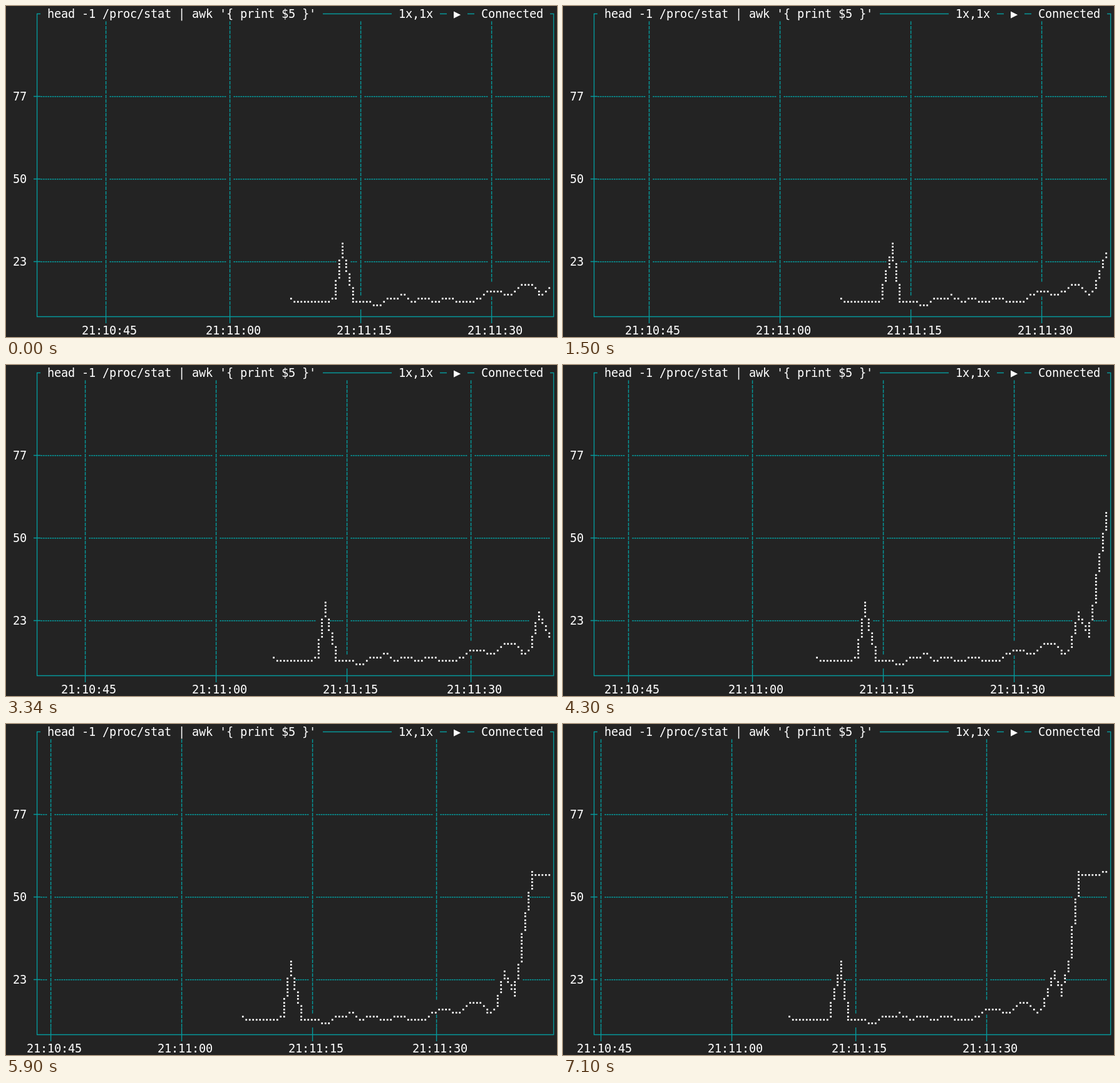
An HTML page for the animation above (8000 ms loop, 880 by 529 pixels).

```html
<!DOCTYPE html>
<html lang="en">
<head>
<meta charset="utf-8">
<title>Terminal chart</title>
<style>
  html, body { margin: 0; width: 100%; height: 100%; overflow: hidden; background: #232323; }
  svg { display: block; width: 880px; height: 529px; }
  text {
    font: 18.67px "DejaVu Sans Mono", monospace;
    letter-spacing: calc(11px - 1ch);
    fill: #fff;
    white-space: pre;
  }
  #grid text { fill: #06989a; letter-spacing: 0; }
  #dots text { font-family: "DejaVu Sans", sans-serif; letter-spacing: 0; }
  #frame, #ticks { fill: none; stroke: #06989a; stroke-width: 1.4; }
</style>
</head>
<body>
<svg viewBox="0 0 880 529">
  <path id="frame"/>
  <path id="ticks"/>
  <g id="grid"></g>
  <g id="dots"></g>
  <g id="labels"></g>
</svg>
<script>
const CW = 11, CH = 22, LOOP = 8000;
const LEFT = 4, RIGHT = 79, BOTTOM = 22;
const GRID_ROWS = [6, 12, 18];
const TIMES = ["21:10:45", "21:11:00", "21:11:15", "21:11:30"];

// Braille dot bits by [side][row]
const BITS = [[1, 2, 4, 64], [8, 16, 32, 128]];

// [start ms, seconds scrolled, scroll in braille columns, samples shown]
const STEPS = [
  [0, 0, 0, 31],
  [900, 1, 2.5, 32],
  [1900, 2, 5, 33],
  [4300, 4, 9.93, 35],
  [5000, 5, 12.43, 36],
  [5900, 6, 14.93, 37],
  [7100, 7, 17.43, 38]
];

// One sample per second, in braille rows from the top
const SAMPLES = [
  84.4, 85.2, 85.2, 85.2, 85.2, 84, 68, 85, 85, 85.4,
  86.4, 84, 84, 83, 85, 84, 84.4, 85.2, 84, 84.4,
  85.2, 85.2, 84, 82, 81.7, 83.1, 82.25, 80, 79.7, 83.2,
  81.3, 71, 78, 65, 42.4, 43.2, 43.2, 42
];

const $ = id => document.getElementById(id);
const midX = col => col * CW + 5.6;
const midY = row => row * CH + 12.5;
const hLine = (x0, x1, y) => `M${x0} ${y}H${x1}`;

function addText(group, col, row, str) {
  const el = document.createElementNS("http://www.w3.org/2000/svg", "text");
  el.setAttribute("x", col * CW);
  el.setAttribute("y", row * CH + 19);
  el.textContent = str;
  $(group).append(el);
  return el;
}

function drawFrame() {
  const l = midX(LEFT), r = midX(RIGHT), t = midY(0), b = midY(BOTTOM);
  let d = `M${(LEFT + 1) * CW} ${t}H${l}V${b}H${r}V${t}H${RIGHT * CW}`;
  for (const [from, to] of [[46, 56], [63, 64], [67, 68]]) d += hLine(from * CW, to * CW, t);
  for (const row of GRID_ROWS) d += hLine(LEFT * CW, (LEFT + 1) * CW, midY(row));
  $("frame").setAttribute("d", d);

  const label = (col, row, str) => addText("labels", col, row, str);
  label(6, 0, "head -1 /proc/stat | awk '{ print $5 }'");
  label(57, 0, "1x,1x");
  label(65, 0, "▶");
  label(69, 0, "Connected");
  ["77", "50", "23"].forEach((s, i) => label(1, GRID_ROWS[i], s));
}

function segment(x0, a, x1, b, plot) {
  const dx = x1 - x0, y0 = Math.round(a), y1 = Math.round(b);
  const dy = Math.abs(y1 - y0), up = y1 < y0;
  if (dy <= dx) {
    for (let i = 0; i <= dx; i++) plot(x0 + i, Math.round(a + (b - a) * i / dx));
    return;
  }
  // Steep: share the rows evenly between the columns
  for (let i = 0; i <= dy; i++) {
    const step = Math.floor(i * (dx + 1) / (up ? dy + 1 : dy));
    plot(x0 + Math.min(dx, step), up ? y0 - i : y0 + i);
  }
}

// Character cells are kept in a Map from row * 80 + col to a value
const cellId = (col, row) => row * 80 + col;

function traceCurve(scroll, count) {
  const cells = new Map();
  const plot = (x, y) => {
    const id = cellId(x >> 1, y >> 2);
    cells.set(id, cells.get(id) | BITS[x & 1][y & 3]);
  };
  const xAt = i => Math.round((i ? 82.09 + 2.494 * i : 82.45) - scroll);
  for (let i = 1; i < count; i++) segment(xAt(i - 1), SAMPLES[i - 1], xAt(i), SAMPLES[i], plot);
  return cells;
}

function traceGrid(cols, curve) {
  const cells = new Map();
  const put = (col, row, ch) => curve.has(cellId(col, row)) || cells.set(cellId(col, row), ch);
  for (const row of GRID_ROWS) {
    for (let col = LEFT + 1; col < RIGHT; col++) put(col, row, "┄");
  }
  for (const col of cols) {
    for (let row = 1; row < BOTTOM; row++) put(col, row, "┆");
  }
  return cells;
}

function printCells(group, cells, toChar) {
  const rows = {};
  for (const [id, value] of cells) (rows[Math.floor(id / 80)] ??= []).push([id % 80, toChar(value)]);
  $(group).replaceChildren();
  for (const row in rows) {
    const el = addText(group, 0, row, rows[row].map(c => c[1]).join(""));
    el.setAttribute("x", rows[row].map(c => c[0] * CW).join(" "));
  }
}

drawFrame();
const timeLabels = TIMES.map(s => addText("labels", 0, 23, s));
let shown = null;

function show([, seconds, scroll, count]) {
  const cols = TIMES.map((_, i) => Math.floor(14.1 + 18.75 * i - 1.25 * seconds));
  const curve = traceCurve(scroll, count);
  printCells("dots", curve, bits => String.fromCharCode(0x2800 + bits));
  printCells("grid", traceGrid(cols, curve), ch => ch);
  $("ticks").setAttribute("d", cols.map(c => `M${midX(c)} ${BOTTOM * CH + 1}v${CH}`).join(""));
  timeLabels.forEach((el, i) => el.setAttribute("x", (cols[i] - 3) * CW));
}

const start = performance.now();
function tick() {
  const t = (performance.now() - start) % LOOP;
  const step = STEPS.findLast(s => s[0] <= t);
  if (step !== shown) show(shown = step);
  requestAnimationFrame(tick);
}
tick();
</script>
</body>
</html>
```
